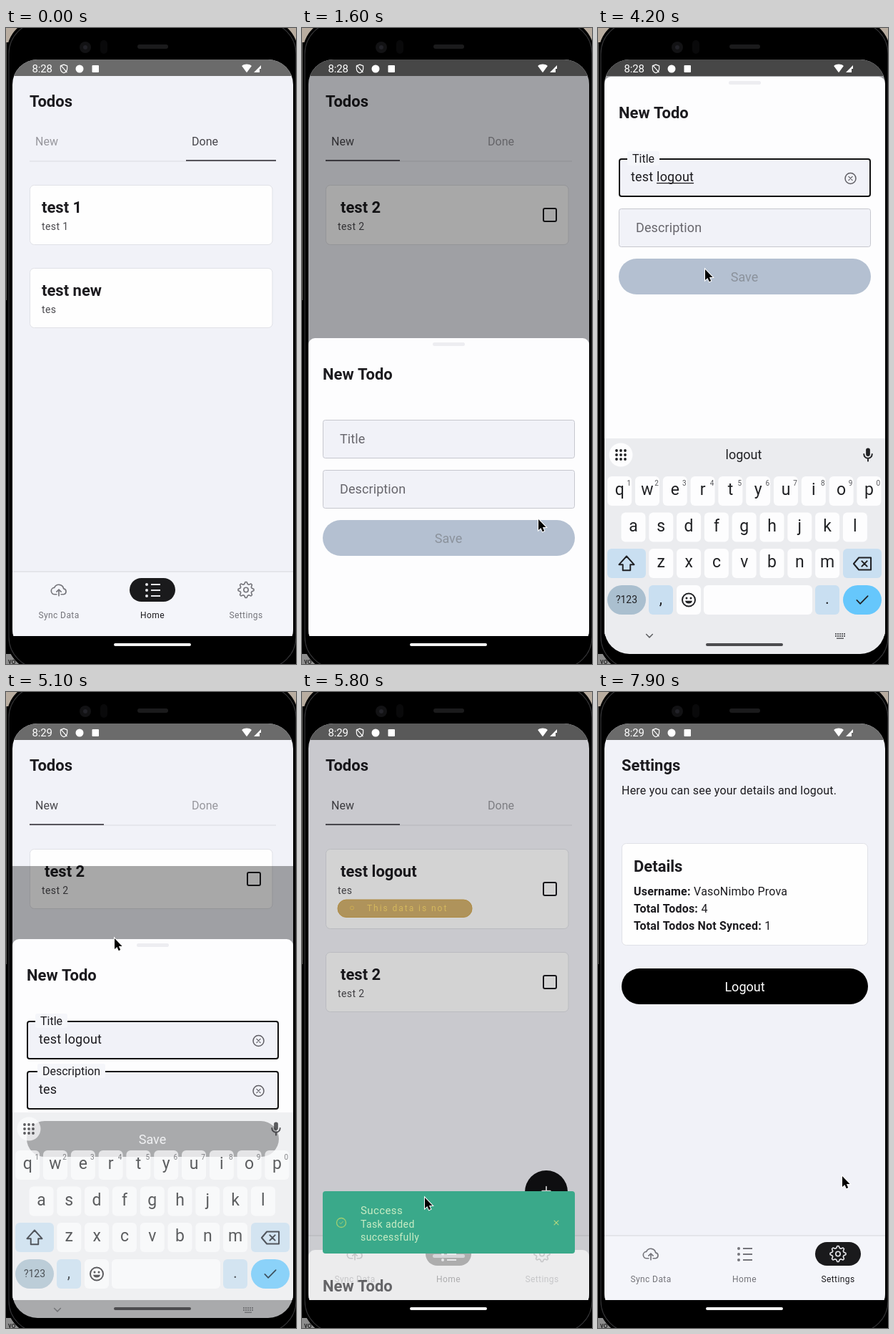
An HTML page with a canvas for the animation above (8 s loop, 406 by 888 pixels).

```html
<!DOCTYPE html>
<html lang="en">
<head>
<meta charset="utf-8">
<title>Todo app</title>
<style>
html, body { margin: 0; width: 100%; height: 100%; overflow: hidden; background: #000; }
canvas { display: block; width: 406px; height: 888px; }
</style>
</head>
<body>
<canvas id="stage" width="406" height="888"></canvas>
<script>
const c = document.getElementById('stage').getContext('2d');
const LOOP = 8000, STEP = 100;
const BG = '#f1f2f8', INK = '#1c1b1f', TOP = 44, FOOT = 849;

const clamp = v => Math.max(0, Math.min(1, v));
const span = (t, a, b) => clamp((t - a) / (b - a));
const mix = (a, b, p) => a + (b - a) * p;
const smooth = p => p * p * (3 - 2 * p);
const out = p => 1 - (1 - p) ** 2;
const inOut = p => p < .5 ? 4 * p ** 3 : 1 - 4 * (1 - p) ** 3;

function box(x, y, w, h, r, fill, stroke, lw = 1) {
  c.beginPath();
  c.roundRect(x, y, w, h, r);
  if (fill) { c.fillStyle = fill; c.fill(); }
  if (stroke) { c.strokeStyle = stroke; c.lineWidth = lw; c.stroke(); }
}
const disc = (x, y, r, fill, stroke, lw) => box(x - r, y - r, 2 * r, 2 * r, r, fill, stroke, lw);

// y is the middle of the capital letters
function text(s, x, y, size, color = INK, { bold, gap = 0, align = 'left' } = {}) {
  c.font = `${bold ? 700 : 400} ${size}px Roboto, sans-serif`;
  c.letterSpacing = gap + 'px';
  c.textAlign = align;
  c.fillStyle = color;
  c.fillText(s, x, Math.round(y + size * .355));
  return c.measureText(s).width;
}

// SVG path on a 24 unit grid, centred on x, y
function icon(d, x, y, size, { fill, stroke, lw = 2 }) {
  c.save();
  c.translate(x - size / 2, y - size / 2);
  c.scale(size / 24, size / 24);
  const p = new Path2D(d);
  if (fill) { c.fillStyle = fill; c.fill(p); }
  if (stroke) {
    c.strokeStyle = stroke;
    c.lineWidth = lw;
    c.lineCap = c.lineJoin = 'round';
    c.stroke(p);
  }
  c.restore();
}
const CROSS = 'M5 5L19 19M19 5L5 19';
const CLOUD = 'M9 18H6.5A4.5 4.5 0 0 1 6 9A6.5 6.5 0 0 1 18.4 10.5A3.8 3.8 0 0 1 18.5 18H15M12 20V12M9 14.5L12 11.5L15 14.5';
const SHIELD = 'M12 2L20 5V11C20 16 17 20 12 22C7 20 4 16 4 11V5Z';
const ARROW = 'M0 0V15L3.4 11.9L5.8 17.2L8.2 16.1L5.9 11H10.6Z';

function phone() {
  c.fillStyle = '#000';
  c.fillRect(0, 0, 406, 888);
  c.fillStyle = '#b9ada0';
  c.fillRect(0, 0, 406, 20);
  c.fillStyle = '#5c5a58';
  c.fillRect(0, 20, 1, 360);
  c.fillStyle = '#8d8d8d';
  c.fillRect(0, 874, 18, 14);
  text('yo', 3, 884, 10, '#111');
  box(1, -12, 408, 910, 46, '#000');
  box(4, -8, 402, 902, 44, null, '#333335', 1.2);
  disc(111, 27, 8, '#121214');
  disc(111, 27, 3, '#222228');
  box(132, 17, 10, 19, 5, '#09090a');
  box(184, 23, 43, 6, 3, '#1b1b1c');
}

function statusBar(t) {
  text(t < 4500 ? '8:28' : '8:29', 36.5, 57, 15, '#fff', { gap: -.2 });
  icon(SHIELD + 'M5 4L19 20', 81, 57, 14, { stroke: '#fff' });
  disc(103, 57, 5.5, '#fff');
  box(120.5, 52, 9.5, 10, 1, '#fff');
  icon('M12 22L1 7C7 2 17 2 23 7Z', 337, 56, 15, { fill: '#fff' });
  icon('M2 22H18V12H22V2Z', 352, 57, 12, { fill: '#fff' });
}

function card(x, y, h, title, sub, checkable) {
  box(x + .5, y + .5, 339.5, h, 6, '#fefefe', '#e0e1e7');
  text(title, x + (checkable ? 21 : 17), y + 31, 22, INK, { bold: true });
  text(sub, x + 17, y + 58, 14, '#4a494e', { gap: .4 });
  if (checkable) box(x + 305, Math.round(y + h / 2 - 9), 18, 18, 2, null, INK, 2);
}

function todos(t) {
  const p = smooth(span(t, 300, 700));
  text('Todos', 33, 102, 22, INK, { bold: true });
  const tab = on => on ? '#47464b' : '#97979d';
  text('New', 41, 158, 16, tab(p > .5));
  text('Done', 260, 158, 16, tab(p < .5));
  box(33, 185.5, 345, 1, 0, '#dadbe1');
  box(mix(252, 33, p), 184, mix(126, 104, p), 2, 0, '#57555c');

  c.save();
  c.beginPath();
  c.rect(32, 200, 346, 558);
  c.clip();
  const done = 33 + 346 * p, fresh = done - 346;
  if (p < 1) {
    card(done, 219, 83, 'test 1', 'test 1');
    card(done, 335, 83, 'test new', 'tes');
  }
  if (p > 0) {
    const added = t >= 5400;
    if (added) {
      card(fresh, 219, 111, 'test logout', 'tes', true);
      box(50, 290, 188, 24.5, 12, '#d2b16d', '#d3a850');
      disc(70, 301.5, 2.5, null, '#f6cf62');
      text('This data is not', 91, 301.5, 12, '#ffdc70', { gap: 1.95 });
    }
    card(fresh, added ? 363 : 219, 83, 'test 2', 'test 2', true);
    disc(fresh + 309, 698, 30, '#111113');
    icon('M12 5V19M5 12H19', fresh + 309, 696.5, 20, { stroke: '#fff' });
  }
  c.restore();
}

function settings() {
  text('Settings', 33, 102, 22, INK, { bold: true });
  text('Here you can see your details and logout.', 33, 137, 16, INK, { gap: .22 });
  box(33.5, 211.5, 344, 142, 6, '#fefefe', '#e0e1e7');
  text('Details', 50, 243, 22, INK, { bold: true });
  [['Username:', 'VasoNimbo Prova'], ['Total Todos:', '4'], ['Total Todos Not Synced:', '1']]
    .forEach(([name, value], i) => {
      const y = 278.5 + 24 * i;
      const w = text(name, 50, y, 16, INK, { bold: true, gap: .2 });
      text(value, 54.5 + w, y, 16, INK, { gap: .2 });
    });
  box(33, 386, 345, 50, 25, '#000');
  text('Logout', 205.5, 411.5, 18, '#fff', { align: 'center' });
}

function gear(x, y, color) {
  c.beginPath();
  for (let i = 0; i < 32; i++) {
    const a = (i - .5) * Math.PI / 16, r = i % 4 < 2 ? 11 : 8.3;
    c.lineTo(x + r * Math.sin(a), y - r * Math.cos(a));
  }
  c.closePath();
  c.strokeStyle = color;
  c.lineWidth = 1.6;
  c.lineJoin = 'round';
  c.stroke();
  disc(x, y, 3.2, null, color, 1.6);
}

function navBar(active) {
  c.fillStyle = '#f4f5fa';
  c.fillRect(9, 759, 393, 90);
  c.fillStyle = '#e4e5ea';
  c.fillRect(9, 758, 393, 2);
  box(active * 131 + 42, 768, 64, 33, 16.5, '#1a1a1c');
  const tone = i => i === active ? '#e6e6ea' : '#75757b';
  icon(CLOUD, 74, 784.5, 25, { stroke: tone(0), lw: 1.6 });
  for (const y of [777, 785, 793]) {
    disc(197, y, 2, tone(1));
    box(203, y - 1, 13, 2, 0, tone(1));
  }
  gear(336, 784.5, tone(2));
  ['Sync Data', 'Home', 'Settings'].forEach((s, i) =>
    text(s, 74 + 131 * i, 820, 12, i === active ? INK : '#74747a', { gap: .4, align: 'center' }));
}

const TITLE = 'test logout', DESC = 'tes';
function titleAt(t) {
  const n = t < 2000 ? 0
    : t < 2800 ? Math.min(4, Math.floor((t - 1900) / 100))
    : t < 3500 ? 5 : 6 + Math.floor((t - 3500) / 100);
  return TITLE.slice(0, n);
}
const descAt = t => DESC.slice(0, Math.max(0, Math.floor((t - 4500) / 100)));

function field(y, label, floatX, valueAt, t, focused) {
  const value = valueAt(t), active = focused || value;
  const lw = active ? 2 : 1;
  box(29 + lw / 2, y + lw / 2, 353 - lw, 54 - lw, 3, BG, active ? '#111' : '#c6c7ce', lw);
  if (!active) {
    text(label, 53, y + 27, 18, '#67666c', { gap: .1 });
    return;
  }
  c.font = '400 16px Roboto, sans-serif';
  c.letterSpacing = '0px';
  box(floatX - 7, y - 10, c.measureText(label).width + 14, 20, 3, '#f5f6fa');
  text(label, floatX, y, 16);
  const w = text(value, 46, y + 25.5, 18, INK, { gap: .2 });
  if (focused) {
    const word = value.lastIndexOf(' ') + 1, old = valueAt(t - 100);
    const from = c.measureText(value.slice(0, word)).width, to = c.measureText(old).width;
    if (to > from) box(46 + from, y + 34, to - from, 1.2, 0, INK);
    if (t < 3300 || t >= 3500 && t < 4100 || t >= 4400) box(46.5 + w, y + 17, 1.6, 19, 0, '#2b5a52');
  }
  if (value) {
    disc(353.5, y + 28, 7.5, null, '#5f5e64', 1.5);
    icon(CROSS, 353.5, y + 28, 9, { stroke: '#5f5e64', lw: 3.2 });
  }
}

function sheet(t, y) {
  c.save();
  c.beginPath();
  c.rect(9, TOP, 393, FOOT - TOP);
  c.clip();
  c.globalAlpha = clamp(1.3 * (1 - span(t, 5500, 6100)));
  box(9, y, 393, 900, 9, '#fdfdfe');
  box(183, y + 6, 45, 5, 2.5, '#ededf1');
  text('New Todo', 29, y + 50.5, 22, INK, { bold: true });
  field(y + 114, 'Title', 48, titleAt, t, t >= 1900 && t < 4400);
  field(y + 184, 'Description', 51, descAt, t, t >= 4400 && t < 5000);
  const ready = descAt(t);
  box(29, y + 254, 353, 50, 25, ready ? '#000' : '#b4c0d1');
  text('Save', 205, y + 280, 18, ready ? '#fff' : '#8b929c', { align: 'center' });
  c.restore();
}

function hints(t) {
  const n = titleAt(t).length;
  if (t < 2000 || t >= 5000) return [];
  if (t >= 4400) return descAt(t) ? ['te', 'the', 'tell'] : [];
  if (n > 5) return ['', 'logout', ''];
  return n === 4 ? ['tests', 'test', 'testing'] : n === 5 ? ['in', 'the', 'to'] : ['te', 'the', 'tell'];
}

function keyboard(t) {
  const rise = out(span(t, 1850, 2150)), fall = span(t, 5000, 5360);
  if (!rise || fall === 1) return;
  const key = (x, y, w, fill = '#fdfdfe', r = 6) => box(x, y, w, 41, r, fill);
  const blue = '#c9dff1', ink = '#202124', mid = { align: 'center' };
  c.save();
  c.globalAlpha = 1 - fall;
  c.translate(0, Math.round(300 * (1 - rise) + 181 * fall ** 2));
  box(9, 573, 393, 330, 0, '#ebecef');

  disc(32, 596, 16.5, '#fdfdfe');
  for (let i = 0; i < 9; i++) disc(26 + i % 3 * 6, 590 + Math.floor(i / 3) * 6, 1.9, ink);
  const words = hints(t);
  words.forEach((s, i) => text(s, 101 + 103 * i, 596, 18, ink, mid));
  if (words[0]) for (const x of [149, 258]) box(x, 584, 1, 24, 0, '#c6c7ca');
  icon('M12 14a3 3 0 0 0 3-3V5a3 3 0 0 0-6 0v6a3 3 0 0 0 3 3z', 378, 596, 23, { fill: ink });
  icon('M6 11a6 6 0 0 0 12 0M12 17v4', 378, 596, 23, { stroke: ink });

  [['qwertyuiop', 30.2, 626], ['asdfghjkl', 49.5, 676.5], ['zxcvbnm', 88.3, 727]].forEach(([row, x0, y], r) =>
    [...row].forEach((ch, i) => {
      const x = x0 + 38.8 * i;
      key(x - 17, y, 34);
      text(ch, x, y + 18, 23, ink, mid);
      if (!r) text((i + 1) % 10, x + 13, y + 9, 10, '#55565a', mid);
    }));

  key(13, 727, 54, blue);
  icon('M12 3L21 13H16.5V20H7.5V13H3Z', 40, 748, 28, { stroke: ink, lw: 1.7 });
  key(343, 727, 54, blue);
  icon('M8 5H22V19H8L2 12ZM11.5 9L17.5 15M17.5 9L11.5 15', 370, 748, 29, { stroke: ink, lw: 1.7 });
  key(13, 778, 54, '#aabfcf', 20.5);
  text('?123', 40, 798.5, 14, ink, mid);
  key(71, 778, 34, blue);
  text(',', 88, 796, 22, ink, mid);
  key(110, 778, 34);
  disc(127, 798.5, 9, null, ink, 2);
  disc(124, 796, 1.5, ink);
  disc(130, 796, 1.5, ink);
  icon('M6 13.5A6.2 6.2 0 0 0 18 13.5Z', 127, 798.5, 20, { fill: ink });
  key(148, 778, 152);
  key(304, 778, 34, blue);
  text('.', 321, 796, 22, ink, mid);
  key(343, 778, 54, '#66c7fc', 20.5);
  icon('M4 12.5L9 17.5L20 6.5', 370, 798.5, 23, { stroke: ink, lw: 1.8 });

  icon('M5 8L12 15L19 8', 72, 849, 15, { stroke: '#5f6063', lw: 2.4 });
  for (let i = 0; i < 10; i++) box(332 + i % 5 * 3, 845 + Math.floor(i / 5) * 3, 2, 2, 0, '#5f6063');
  box(334, 851.5, 10, 1.6, 0, '#5f6063');
  c.restore();
}

function toast(t) {
  const a = span(t, 5500, 5700) * (1 - span(t, 7000, 7300));
  if (!a) return;
  const pale = '#c9ecc4';
  c.save();
  c.globalAlpha = a;
  box(29, 697, 353, 87, 4, '#3aa98a');
  disc(55, 741, 6.5, null, '#9fce72', 1.3);
  icon('M5 12L10 17L19 7', 55, 741, 8, { stroke: '#9fce72', lw: 3 });
  text('Success', 82, 724, 15, pale, { gap: .4 });
  text('Task added', 82, 743, 14, pale, { gap: .4 });
  text('successfully', 82, 761, 14, pale, { gap: .4 });
  icon(CROSS, 356, 741, 10, { stroke: '#b5d77e', lw: 2.6 });
  c.restore();
}

// time, x, y of the pointer tip
const PATH = [
  [0, 5, -30], [300, 57, 160], [450, 57, 160], [900, 336, 690], [1100, 331, 686], [1600, 331, 686],
  [1800, 190, 574], [2200, 166, 561], [2700, 166, 561], [3100, 150, 337], [4400, 150, 337],
  [4800, 152, 344], [5200, 152, 344], [5800, 172, 706], [6200, 172, 706], [7000, 300, 712],
  [7400, 338, 785], [7600, 338, 785], [7900, 342, 676], [8000, 342, 676]
];
function pointer(t) {
  const i = PATH.findIndex(k => k[0] > t), a = PATH[i - 1], b = PATH[i];
  const p = smooth(span(t, a[0], b[0]));
  c.save();
  c.translate(mix(a[1], b[1], p), mix(a[2], b[2], p));
  const arrow = new Path2D(ARROW);
  c.strokeStyle = '#fff';
  c.lineWidth = 2;
  c.stroke(arrow);
  c.fillStyle = '#000';
  c.fill(arrow);
  c.restore();
}

function sheetTop(t) {
  if (t < 1850) return mix(FOOT, 433, out(span(t, 1050, 1500)));
  if (t < 5000) return mix(433, 64, out(span(t, 1850, 2150))) + 4 * span(t, 2250, 2500);
  if (t < 5500) return mix(68, 433, out(span(t, 5000, 5197)));
  return mix(433, FOOT, inOut(span(t, 5500, 5960)));
}

function draw(t) {
  phone();
  c.save();
  c.beginPath();
  c.roundRect(9, TOP, 393, 830, 35);
  c.clip();
  c.fillStyle = BG;
  c.fillRect(9, TOP, 393, 805);
  c.fillStyle = '#6b6b6b';
  c.fillRect(9, TOP, 393, 23);
  const away = t >= 7500;
  away ? settings() : todos(t);
  navBar(away ? 2 : 1);

  const dim = .34 * span(t, 1050, 1400) * (1 - span(t, 5500, 6100));
  const y = TOP + 199 * Math.sin(Math.PI * span(t, 5000, 5200));
  c.fillStyle = `rgba(0,0,0,${dim})`;
  c.fillRect(9, y, 393, FOOT - y);
  const top = Math.round(sheetTop(t));
  if (top < FOOT) sheet(t, top);
  statusBar(t);

  c.fillStyle = '#000';
  c.fillRect(9, FOOT, 393, 30);
  keyboard(t);
  const handle = t < 1900 || t >= 5300 ? '#f4f4f4' : t < 2800 ? '#b9b9bc' : '#4c4c4f';
  box(151, 859, 108, 4, 2, handle);
  toast(t);
  c.restore();
  pointer(t);
}

function tick() {
  draw(Math.floor(performance.now() % LOOP / STEP) * STEP);
  requestAnimationFrame(tick);
}
tick();
</script>
</body>
</html>
```
